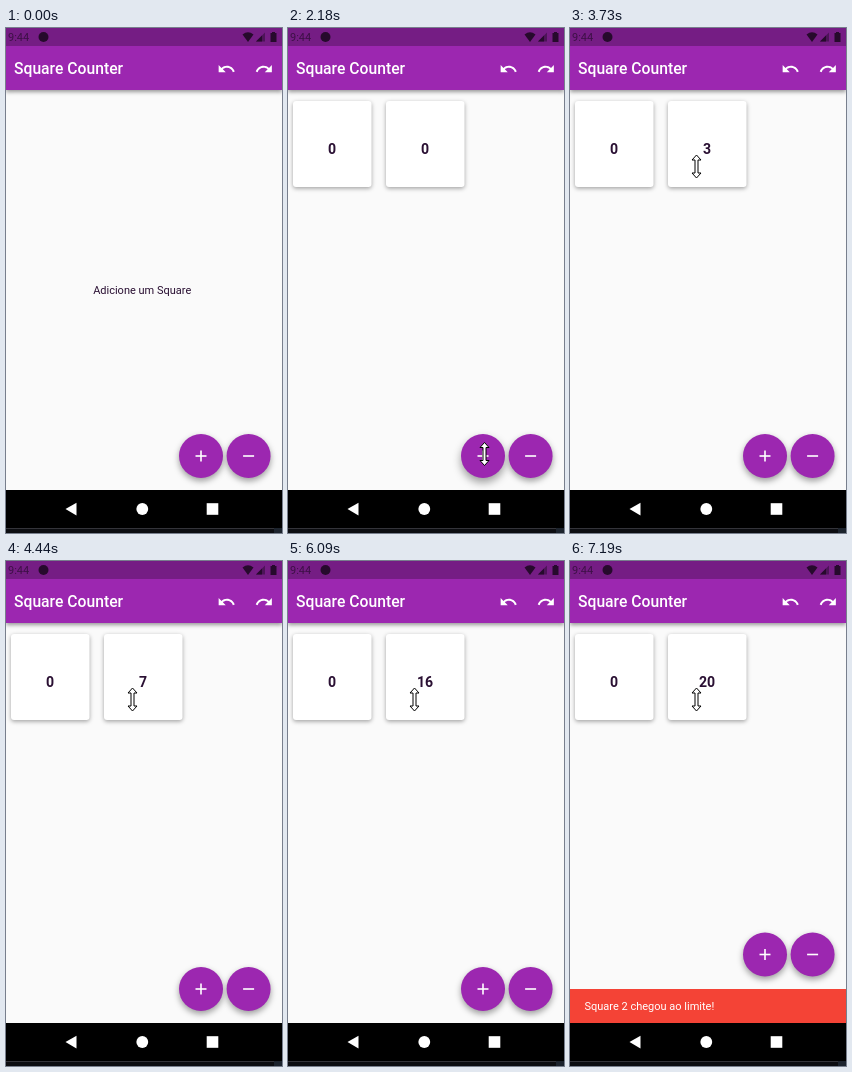
An HTML page with a canvas for the animation above (8 s loop, 276x505 px).

```html
<!DOCTYPE html>
<html lang="pt">
<head>
<meta charset="utf-8">
<title>Square Counter</title>
<style>
  html, body { margin: 0; width: 100%; height: 100%; overflow: hidden; background: #000; }
  canvas { display: block; width: 100vw; height: 100vh; }
</style>
</head>
<body>
<canvas id="stage"></canvas>
<script>
const W = 276, H = 505, LOOP = 8000;
const canvas = document.getElementById('stage');
const ctx = canvas.getContext('2d');
const dpr = window.devicePixelRatio || 1;
canvas.width = W * dpr;
canvas.height = H * dpr;

const PURPLE = '#9c27b0', INK = '#2a1033';
const DP = 0.785; // pixels per design unit

const FIRST_CARD = 1560, SECOND_CARD = 2180, SNACK = 7000, SNACK_TIME = 185;
const LIMIT = 20, TAP_GAP = 77;

// Moments at which a tap on the second card is released
const taps = [3420, 3580, 3730, 3890, 4130, 4280, 4440, 4600, 4830, 4990, 5150,
              5300, 5460, 5700, 5860, 6020, 6250, 6410, 6560, 6720, 7030];
// Fast taps during which the pointer never looks released
const heldTaps = [4830, 6250, 6410];

// Pointer keys: time, x, y
const route = [
  [220, 242, 500], [380, 222, 462], [540, 184, 434], [640, 174, 430], [860, 190, 427],
  [1020, 190.5, 426.5], [1100, 196.5, 426],
  [2500, 196.5, 426], [2660, 182, 385], [2960, 112.5, 205.5], [3110, 118, 168], [3260, 126.5, 138.5]
];

const undoIcon = new Path2D('M12.5 8c-2.65 0-5.05.99-6.9 2.6L2 7v9h9l-3.62-3.62c1.39-1.16 3.16-1.88 5.12-1.88 3.54 0 6.55 2.31 7.6 5.5l2.37-.78C21.08 11.03 17.15 8 12.5 8z');
const arrowHalf = [[0, -11.5], [4.5, -6.5], [1.5, -6.5], [1.5, 6.5], [4.5, 6.5], [0, 11.5]];

const clamp = v => Math.min(1, Math.max(0, v));
const easeOut = p => 1 - Math.pow(1 - p, 2.4);

function rect(x, y, w, h, color) {
  ctx.fillStyle = color;
  ctx.fillRect(x, y, w, h);
}

function circle(x, y, r, color) {
  ctx.fillStyle = color;
  ctx.beginPath();
  ctx.arc(x, y, r, 0, Math.PI * 2);
  ctx.fill();
}

function polygon(points, color) {
  ctx.fillStyle = color;
  ctx.beginPath();
  points.forEach(([x, y]) => ctx.lineTo(x, y));
  ctx.closePath();
  ctx.fill();
}

function label(text, x, y, size, color, weight = 400, align = 'left') {
  ctx.font = `${weight} ${size}px Roboto, sans-serif`;
  ctx.textAlign = align;
  ctx.fillStyle = color;
  ctx.fillText(text, x, y);
}

function shadowed(blur, dy, alpha, draw) {
  ctx.save();
  ctx.shadowColor = `rgba(0,0,0,${alpha})`;
  ctx.shadowBlur = blur * dpr;
  ctx.shadowOffsetY = dy * dpr;
  draw();
  ctx.restore();
}

function drawArrow(x, y, flip) {
  ctx.save();
  ctx.translate(x, y);
  ctx.scale(flip * DP, DP);
  ctx.translate(-12, -12);
  ctx.fillStyle = '#fff';
  ctx.fill(undoIcon);
  ctx.restore();
}

function drawStatus() {
  const dark = '#260a2c';
  rect(0, 0, W, 18, '#751d84');
  label('9:44', 2, 13, 11, '#3d1046');
  circle(37.5, 9, 5, dark);
  ctx.fillStyle = dark;
  ctx.beginPath();
  ctx.moveTo(242, 14);
  ctx.lineTo(236.5, 6.5);
  ctx.quadraticCurveTo(242, 1.8, 247.5, 6.5);
  ctx.fill();
  polygon([[250, 13.5], [259, 13.5], [259, 4.5]], '#4d1458');
  polygon([[250, 13.5], [256, 13.5], [256, 7.5]], dark);
  rect(264.5, 5, 6, 9, dark);
  rect(266, 4, 3, 1, dark);
}

function drawBars() {
  shadowed(4, 1.5, 0.4, () => rect(0, 18, W, 44, PURPLE));
  drawStatus();
  label('Square Counter', 8, 46.3, 15.7, '#fff', 500);
  drawArrow(220.5, 41, 1);
  drawArrow(258, 41, -1);
}

function drawNav() {
  rect(0, 462, W, 43, '#000');
  rect(0, 500, W, 1, '#34343a');
  rect(0, 501, W, 4, '#0c0d11');
  rect(268, 500, 8, 5, '#1c232d');
  polygon([[59.5, 481], [70.5, 474.8], [70.5, 487.4]], '#fff');
  circle(136.3, 481, 5.9, '#fff');
  rect(200.7, 475.2, 11.6, 11.6, '#fff');
}

function drawCard(x, value) {
  shadowed(4.5, 1.6, 0.36, () => {
    ctx.fillStyle = '#fff';
    ctx.beginPath();
    ctx.roundRect(x, 73, 78.5, 86, 3);
    ctx.fill();
  });
  label(value, x + 39, 125.5, 14.1, INK, 700, 'center');
}

function drawButton(x, y, plus, lift) {
  shadowed(6 + 4 * lift, 3 + 2 * lift, 0.38, () => circle(x, y, 22, PURPLE));
  rect(x - 5.5, y - 0.8, 11, 1.6, '#fff');
  if (plus) rect(x - 0.8, y - 5.5, 1.6, 11, '#fff');
}

function drawSnack(shown) {
  const top = 462 - 34 * shown;
  rect(0, top, W, 35, '#f44336');
  ctx.globalAlpha = shown;
  label('Square 2 chegou ao limite!', 14.5, top + 21, 11, '#fff');
  ctx.globalAlpha = 1;
}

function pointerAt(t) {
  const last = route[route.length - 1];
  if (t >= last[0]) return [last[1], last[2]];
  const i = route.findIndex(k => k[0] > t);
  const [t0, x0, y0] = route[i - 1], [t1, x1, y1] = route[i];
  const p = (t - t0) / (t1 - t0);
  return [x0 + (x1 - x0) * p, y0 + (y1 - y0) * p];
}

function isPressed(t) {
  if (t < 3000) return (t >= 1250 && t < 1330) || (t >= 2100 && t < 2180);
  if (t < 3340 || t >= taps[taps.length - 1]) return false;
  return !taps.some(r => !heldTaps.includes(r) && t >= r && t < r + TAP_GAP);
}

function drawPointer(t) {
  if (t < route[0][0]) return;
  const [x, y] = pointerAt(t);
  ctx.save();
  ctx.translate(x, y);
  ctx.beginPath();
  arrowHalf.forEach(([px, py]) => ctx.lineTo(px, py));
  arrowHalf.slice(1, -1).reverse().forEach(([px, py]) => ctx.lineTo(-px, py));
  ctx.closePath();
  ctx.fillStyle = '#fff';
  ctx.fill();
  ctx.strokeStyle = '#000';
  ctx.lineWidth = 1;
  ctx.stroke();
  ctx.restore();
  if (isPressed(t)) circle(x - 0.5, y, 12, 'rgba(255,250,0,0.55)');
}

function draw(t) {
  ctx.setTransform(dpr, 0, 0, dpr, 0, 0);
  rect(0, 0, W, H, '#fafafa');
  drawBars();

  if (t < FIRST_CARD) label('Adicione um Square', 136.2, 266.3, 11, INK, 400, 'center');
  else drawCard(5, 0);
  if (t >= SECOND_CARD) drawCard(98, Math.min(LIMIT, taps.filter(r => r <= t).length));

  const shown = easeOut(clamp((t - SNACK) / SNACK_TIME));
  const lift = t > 2100 && t < 2420 ? Math.sin((t - 2100) / 320 * Math.PI) : 0;
  const y = 428 - 34.5 * shown;
  if (shown > 0) drawSnack(shown);
  drawButton(195, y, true, lift);
  drawButton(242.6, y, false, 0);
  drawNav();
  drawPointer(t);
}

const start = performance.now();
function tick() {
  draw((performance.now() - start) % LOOP);
  requestAnimationFrame(tick);
}
tick();
</script>
</body>
</html>
```
